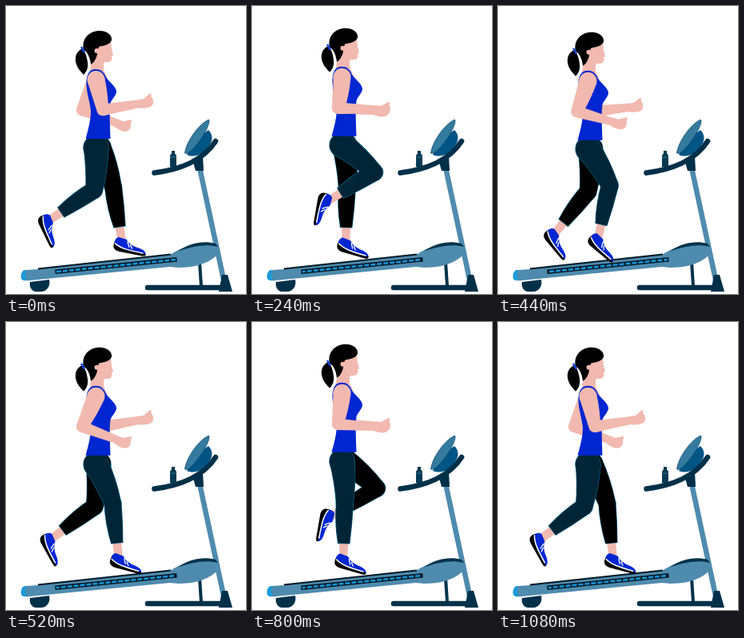
These frames come from a looping animation (300x360 px, 1.12 s). An HTML page with a canvas:

```html
<!DOCTYPE html>
<html lang="en">
<head>
<meta charset="utf-8">
<title>Treadmill run</title>
<style>
  html, body { margin: 0; width: 100%; height: 100%; overflow: hidden; background: #fff; }
  svg, canvas { position: absolute; left: 0; top: 0; width: 300px; height: 360px; }
</style>
</head>
<body>
<svg viewBox="0 0 300 360" fill="none">
  <!-- frame and base -->
  <path d="M30 345L54 342C56 350 51 357 44 357H37C31 356 29 350 30 345Z" fill="#003049"/>
  <path d="M242 320L244 350" stroke="#00344b" stroke-width="4"/>
  <path d="M177 352H268" stroke="#003049" stroke-width="6.5" stroke-linecap="round"/>
  <path d="M242 202L272 342" stroke="#4f8bae" stroke-width="6.5"/>
  <path d="M270 336H277L283 357H266Z" fill="#003049"/>
  <!-- deck -->
  <path d="M26 330L40 329L205 311C222 300 240 296 258 297C266 300 267 308 262 313C250 323 235 327 215 327L205 326L30 343C20 344 18 341 19 336C20 331 22 330 26 330Z" fill="#4f8bae"/>
  <path d="M25 330Q23 336 26 343C20 344 18 341 19 336C20 331 22 330 25 330Z" fill="#1c9bd8"/>
  <path d="M215 306.5C230 296 247 293 262 297L265 301C250 297 234 300 215 306.5Z" fill="#00344b"/>
  <path d="M40 328.5L206 310.5" stroke="#001a26" stroke-width="2"/>
  <path d="M61.5 332.3L213.5 316.8" stroke="#001a26" stroke-width="5.5"/>
  <path id="belt" d="M63 332.2L212 317" stroke="#1296dd" stroke-width="2.5" stroke-dasharray="6 2"/>
  <!-- console -->
  <path d="M226 186C234 172 245 160 253 155C259 161 259 168 253 176C246 186 236 190 226 186Z" fill="#005586"/>
  <path d="M223.500 184C225 170 241 147 253.500 142C256 145 249 160 240 171C234 179 227 186 223.500 184Z" fill="#357a9f" stroke="#06486a" stroke-width=".7"/>
  <path d="M185.5 208.5C215 205 246 194 262 169" stroke="#003049" stroke-width="6.5" stroke-linecap="round"/>
  <path d="M233 192L246 187L247 206H237Z" fill="#003049"/>
  <path d="M207 181H211V184L213 187V201H205V187L207 184Z" fill="#073a52"/>
  <path d="M205 189H213" stroke="#2f7396"/>
</svg>
<canvas id="stage"></canvas>
<script>
const LOOP = 1120, STEP = 40;
const THIGH = 53, SHANK = 69, CUFF = 50, FOREARM = 48;
const SKIN = '#f1b9af', BLUE = '#0026d2', NAVY = '#002536', BLACK = '#000';
const canvas = document.getElementById('stage');
const belt = document.getElementById('belt');
const ctx = canvas.getContext('2d');
const ratio = window.devicePixelRatio || 1;
canvas.width = 300 * ratio;
canvas.height = 360 * ratio;

// periodic curve: a mean plus [cos, sin] weights of each harmonic
const wave = (mean, ...parts) => phase => parts.reduce(
  (sum, [c, s], i) => sum + c * Math.cos((i + 1) * phase) + s * Math.sin((i + 1) * phase), mean);

// degrees: leg parts forward from straight down, shoe down from level
const thighAngle = wave(18, [-8.4, 22], [-8.9, 2], [-3.1, -2.2]);
const shankAngle = wave(-26.7, [-28.9, -20.7], [3.2, -0.6], [-3.6, 5.3]);
const shoeAngle = wave(47, [25.3, 32.5], [-10.5, 1], [1.2, -7]);
const bob = wave(-0.7, [1.5, -1.4], [-0.8, 0]);

const rad = deg => deg * Math.PI / 180;
const hang = ([x, y], len, deg) => [x + len * Math.sin(rad(deg)), y + len * Math.cos(rad(deg))];

function disc([x, y], r) {
  const path = new Path2D();
  path.arc(x, y, r, 0, 7);
  return path;
}

// tapered segment whose back and front edges may swell
function taper([ax, ay], ra, [bx, by], rb, back = 0, front = 0) {
  const len = Math.hypot(bx - ax, by - ay) || 1;
  const nx = (ay - by) / len, ny = (bx - ax) / len;
  const mx = (ax + bx) / 2, my = (ay + by) / 2, rm = (ra + rb) / 2;
  const path = new Path2D();
  path.moveTo(ax + nx * ra, ay + ny * ra);
  path.quadraticCurveTo(mx + nx * (rm + back), my + ny * (rm + back), bx + nx * rb, by + ny * rb);
  path.lineTo(bx - nx * rb, by - ny * rb);
  path.quadraticCurveTo(mx - nx * (rm + front), my - ny * (rm + front), ax - nx * ra, ay - ny * ra);
  path.closePath();
  return path;
}

function paint(paths, fill, edge) {
  if (edge) {
    ctx.strokeStyle = edge;
    ctx.lineWidth = 1.2;
    paths.forEach(p => ctx.stroke(p));
  }
  ctx.fillStyle = fill;
  paths.forEach(p => ctx.fill(p));
}

function shape(d, fill) {
  ctx.fillStyle = fill;
  ctx.fill(new Path2D(d));
}

function line(d, color, width) {
  ctx.strokeStyle = color;
  ctx.lineWidth = width;
  ctx.stroke(new Path2D(d));
}

function placed([x, y], angle, draw) {
  ctx.save();
  ctx.translate(x, y);
  ctx.rotate(angle);
  draw();
  ctx.restore();
}

// drawn around the ankle
function shoe() {
  shape('M-9 5C-10 0 -8 -4 -5 -5L5 -4C9 1 15 3 22 4C28 5 32 7 32 11L0 11Z', BLUE);
  shape('M-9 2C-11 8 -8 12 -2 12.500L28 13Q33 13 32 10L20 9.500C8 9 -2 8 -9 2Z', BLACK);
  line('M-8 3.500C0 8.500 10 9 28 9.500', '#fff', 1.500);
  line('M7 -1L10 5M11 2L14 6', '#fff', 1.300);
}

function leg(phase, hip, color) {
  const knee = hang(hip, THIGH, thighAngle(phase));
  const shank = shankAngle(phase);
  const cuff = hang(knee, CUFF, shank), ankle = hang(knee, SHANK, shank);
  paint([taper(cuff, 5.5, ankle, 5), disc(ankle, 5)], SKIN);
  placed(ankle, rad(shoeAngle(phase)), shoe);
  paint([
    disc(hip, 15.5), taper(hip, 15.5, knee, 10.5, -2.5, 3),
    disc(knee, 10.5), taper(knee, 10.5, cuff, 7.2, 3, 1)
  ], color, '#0b6f98');
}

function arm(phase, dy) {
  const u = Math.cos(phase + 0.11), swing = (u + u ** 3) / 2;
  const tilt = 3 - 15.5 * swing + 2.5 * u * u;
  const shoulder = [112.5, 92 + dy], elbow = [108 + 13 * swing, 131 - u * u + dy];
  const wrist = hang(elbow, FOREARM, 90 - tilt);
  paint([
    disc(shoulder, 11), taper(shoulder, 11, elbow, 7.3, 0, 2),
    disc(elbow, 7.3), taper(elbow, 7.3, wrist, 4.8)
  ], SKIN);
  placed(wrist, rad(tilt), () =>
    shape('M-3 -5L5 -5L13 -10Q16.500 -10.500 14.500 -7L16 -3Q17 4 12 6Q5 8 -3 5Z', SKIN));
}

function torso() {
  shape('M107 66L122 68L122 80L127 90L120 100L104 96L105 80Z', SKIN);
  shape('M100.500 98C100 86 104 79 112 79C120 79 123 84 125 89C129 95 138 101 138 107C138 112 132 116 130.500 122C129 132 130 148 130.500 166H99.500C103 154 106 142 106 131C105 120 101 110 100.500 98Z', BLUE);
}

function head() {
  shape('M112 47L131 44L132 54L134 61L132 63L132.500 66L131 69Q128 71 123 70L121 76L107 74L108 58Z', SKIN);
  shape('M97 55C94 41 104 31 117 31C127 31 133 37 132 43C130 48 122 50 117 50.500C114 52 115 61 112 66Q110 71 106 73C105 65 102 57 97 55Z', BLACK);
  paint([disc([113.5, 56], 3)], SKIN);
  shape('M96 53C88 56 85 64 88 73C90 79 94 82 97 86C101 82 103 77 102 70C101 63 99 58 97 55Z', BLACK);
  line('M94.500 52L97.500 57', '#1646dc', 2.500);
}

function draw(t) {
  const near = t / LOOP * 2 * Math.PI, far = near + Math.PI;
  const dy = bob(2 * near);
  ctx.setTransform(ratio, 0, 0, ratio, 0, 0);
  ctx.clearRect(0, 0, 300, 360);
  ctx.lineCap = 'round';
  arm(far, dy);
  leg(far, [115.5, 177 + dy], BLACK);
  leg(near, [112.5, 177 + dy], NAVY);
  ctx.save();
  ctx.translate(0, dy);
  torso();
  head();
  ctx.restore();
  arm(near, dy);
  belt.style.strokeDashoffset = t / LOOP * 8 * 20;
}

const start = performance.now();
function tick() {
  const t = (performance.now() - start) % LOOP;
  draw(Math.floor(t / STEP) * STEP);
  requestAnimationFrame(tick);
}
tick();
</script>
</body>
</html>
```
